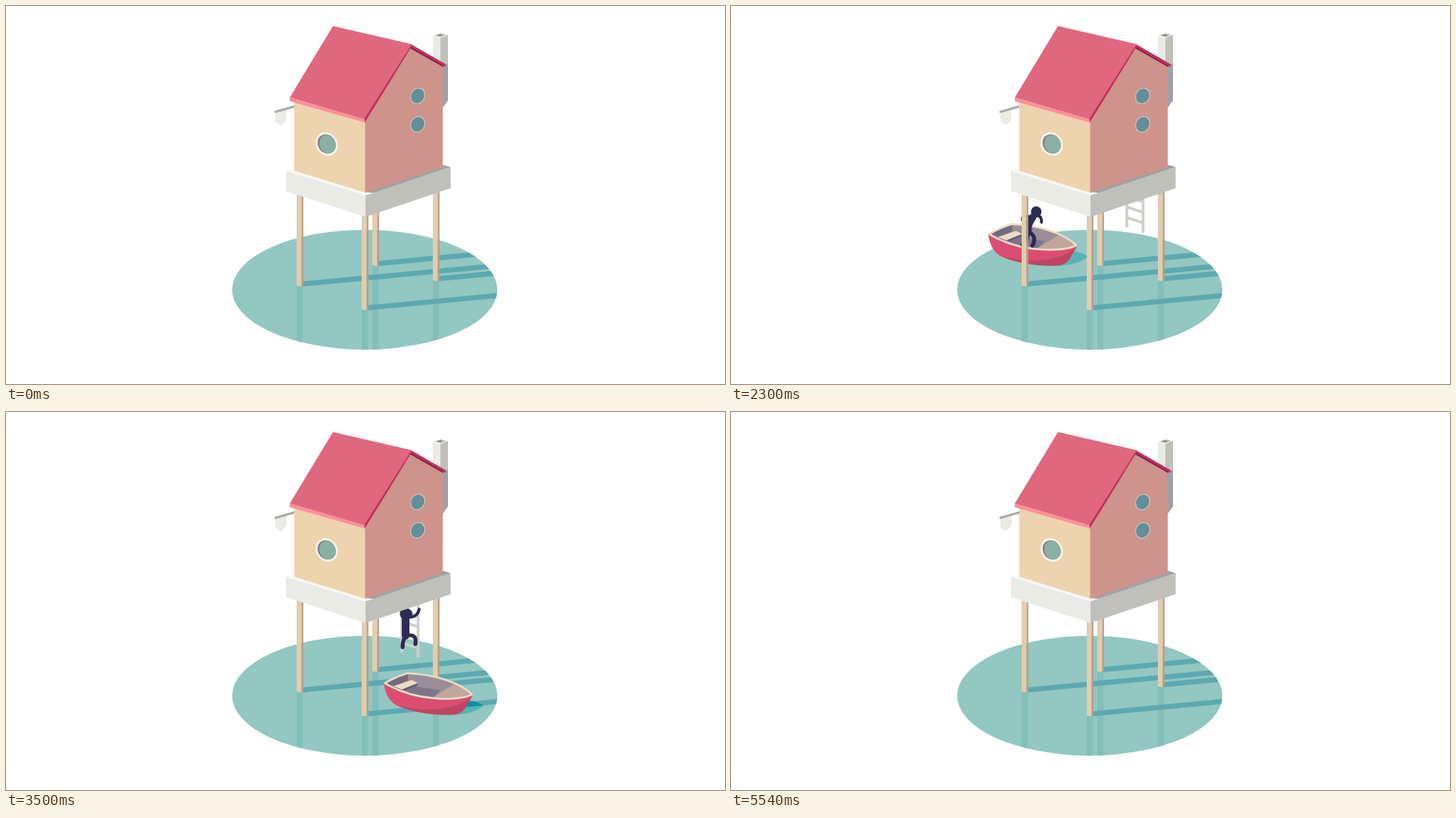
An HTML page for the animation above (6540 ms loop, 950 by 500 pixels).

```html
<!DOCTYPE html>
<html lang="en">
<head>
<meta charset="utf-8">
<title>House on stilts</title>
<style>
  html, body { margin: 0; height: 100%; overflow: hidden; background: #fff; }
  svg { display: block; width: 100vw; height: 100vh; }
  .line { fill: none; stroke-linecap: round; stroke-linejoin: round; }
</style>
</head>
<body>
<svg viewBox="0 0 950 500">
  <defs>
    <ellipse id="pond" cx="474" cy="375.2" rx="175.2" ry="79.2"/>
    <path id="rim" d="M500.500 358.500Q515 350 530.500 345.500C562 347 598 356 615.500 373.500C598 383 540 383 500.500 358.500Z"/>
    <path id="wake" d="M555 399Q610 406 631 388.500Q622 382 606 380Z"/>
    <clipPath id="inPond"><use href="#pond"/></clipPath>
    <clipPath id="inShade"><path class="shade"/></clipPath>
    <clipPath id="inRim"><use href="#rim"/></clipPath>
    <clipPath id="inView"><path d="M300 460V312Q335 287 372 278L450 240H720L700 366L683 389Q670 409 652 430L640 446V460Z"/></clipPath>
    <clipPath id="inWindow"><ellipse rx="12" ry="12.700" transform="translate(423.700 182.500) skewY(8)"/></clipPath>
  </defs>

  <!-- water -->
  <use href="#pond" fill="#93c7c1"/>
  <g clip-path="url(#inPond)">
    <path id="reflections" fill="#83bfb8"/>
    <path class="shade" fill="#5da9b1"/>
    <g clip-path="url(#inView)"><use class="drift" href="#wake" fill="#57b3b5"/></g>
    <g clip-path="url(#inShade)"><use class="drift" href="#wake" fill="#0f8fa2"/></g>
  </g>

  <g id="backPoles"></g>
  <path id="ladder" fill="none" stroke="#cfcfc9" stroke-width="3.700"/>

  <g clip-path="url(#inView)">
    <g class="drift">
      <path fill="#db4e72" d="M499 358C501 374 507 384 518 389C540 398 565 401.500 594 400Q602 398 606 392.500L617 373.500L560 368Z"/>
      <path fill="#bf4560" d="M514 387C545 397 592 397 616 376L606 392.500Q602 398 594 400C565 401.500 535 397 514 387Z"/>
      <g clip-path="url(#inRim)">
        <path fill="#998e97" d="M495 340H620V385H495Z"/>
        <path fill="#7d7589" d="M505 364L532 357L546 364L574 368L561 381L530 378Z"/>
        <path fill="#736b81" d="M499 360L531 344V355L508 366Z"/>
        <path fill="#c2a69b" d="M558 381L597 357L620 365V383Z"/>
        <path fill="#625a70" d="M524 366L544 358.500V361L527 368Z"/>
        <path fill="#ecdcc3" d="M512 362.500L536 354.500L544 358.500L523 367Z"/>
      </g>
      <use href="#rim" class="line" stroke="#ecdcc3" stroke-width="2.600"/>
    </g>
    <g class="line" stroke="#2b2c52">
      <path id="torso" stroke-width="10"/>
      <path id="arms" stroke-width="3.800"/>
      <path id="legs" stroke-width="5.200"/>
      <circle id="head" r="7" fill="#2b2c52" stroke="none"/>
    </g>
  </g>

  <g id="frontPoles"></g>

  <!-- platform -->
  <path fill="#ebebe6" d="M370 218L475 249V279L370 245Z"/>
  <path fill="#bfc0ba" d="M475 250L587.500 213V241L475 279Z"/>
  <path fill="#f8f8f5" d="M370 218L381 214L475 245L486 247L475 250.500Z"/>
  <path fill="#9fa2a5" d="M475 246L577 210L587.500 213L485 247.200Z"/>

  <!-- chimney and flag -->
  <path fill="#ebebe6" d="M564 39L574 42V76L564 70Z"/>
  <path fill="#bfc0ba" d="M574 42L584 38V80H574Z"/>
  <path fill="#9fa1a6" d="M576 80L584 76V125L576 136Z"/>
  <path fill="#f5f5f1" d="M564 39L574 35.500L584 38L574 42Z"/>
  <path fill="#92958f" d="M567 39L574.500 36.500L581 38.200L574 40.800Z"/>
  <path fill="#bfc0ba" d="M574.500 36.500L581 38.200L577 39.700Z"/>
  <path fill="#e9ebe5" d="M356 140L370.500 136V150L364 158L356 153Z"/>
  <path class="line" stroke="#abaca6" stroke-width="3" d="M356 140L384 132"/>

  <!-- house -->
  <path fill="#eed3af" d="M381 124L475 152V247L381 218Z"/>
  <path fill="#ce938a" d="M474.500 154L535 53L577 78V213L474.500 247Z"/>
  <path fill="#8f2149" d="M534 53L578 78V81L534 56Z"/>
  <path fill="#c02f5c" d="M535 50.500L581 77V80.500L535.500 54L474 154.500L473 149Z"/>
  <path fill="#df687e" d="M432 26.500L536 50.500L473 150L375 121Z"/>
  <path fill="#fb9198" d="M375 121L473.500 149.500V154L375 126Z"/>

  <!-- windows -->
  <ellipse rx="14.800" ry="15.500" fill="#f6f3ea" transform="translate(423.700 182.500) skewY(8)"/>
  <g clip-path="url(#inWindow)">
    <path fill="#8c7981" d="M405 165h35v35h-35z"/>
    <ellipse rx="12" ry="12.700" fill="#89b0a3" transform="translate(426 183) skewY(8)"/>
    <g id="peek" fill="#2b2c52">
      <circle cx="429" cy="181" r="7"/>
      <path d="M428 185L438 182V198L431 193Z"/>
    </g>
  </g>
  <g id="sideWindows"></g>
</svg>
<script>
const $ = id => document.getElementById(id);
const all = selector => document.querySelectorAll(selector);
const draw = (el, d) => el.setAttribute('d', d);
const move = (el, x, y) => el.setAttribute('transform', `translate(${x} ${y})`);

const LOOP = 6540;
const ramp = (t, from, to) => Math.min(1, Math.max(0, (t - from) / (to - from)));
const ease = (t, from, to) => { const k = ramp(t, from, to); return k * k * (3 - 2 * k); };
const add = (a, b, k = 1) => [a[0] + b[0] * k, a[1] + b[1] * k];
const mix = (a, b, k) => [a[0] + (b[0] - a[0]) * k, a[1] + (b[1] - a[1]) * k];

// Poles: left x and foot y
const front = [[384, 371], [470, 402.5]], back = [[484, 344], [564, 364]];
const poles = [...front, ...back];
const pole = ([x, y]) =>
  `<path fill="#e2cdae" d="M${x} 235h6.500V${y}L${x} ${y - 1}Z"/>` +
  `<path fill="#b99b87" d="M${x + 6.5} 235h2.300V${y - 0.5}l-2.300 .5Z"/>`;
$('frontPoles').innerHTML = front.map(pole).join('');
$('backPoles').innerHTML = back.map(pole).join('');
draw($('reflections'), poles.map(([x, y]) => `M${x} ${y - 1}h8.300V460h-8.300Z`).join(''));
const shade = poles.map(([x, y]) => `M${x + 8} ${y - 6.8}l300 -28.200v6.800l-300 28.200Z`).join('');
all('.shade').forEach(el => draw(el, shade));

let ladder = 'M523 240V318M544.500 240V325';
for (let y = 263; y < 318; y += 14) ladder += `M523 ${y}l21.500 7.200`;
draw($('ladder'), ladder);

$('sideWindows').innerHTML = [119, 156.5].map(y =>
  `<g transform="translate(544 ${y}) skewY(-8)"><ellipse rx="10.200" ry="11" fill="#c0c1ba"/>` +
  `<ellipse rx="8.600" ry="9.400" fill="#7d7984"/><ellipse cx="-.7" rx="7.900" ry="9.200" fill="#618f9a"/></g>`).join('');

const drift = t => [0.1328 * (t - 3500), 0.0475 * (t - 3500)];

// A curve from a to c that passes through b
const limb = (a, b, c) => `M${a}Q${add(add(b, b), mix(a, c, 0.5), -1)} ${c}`;

function drawMan(t) {
  const crouch = ease(t, 2660, 2980), hang = ease(t, 3080, 3300);
  const stride = t > 3500 ? Math.sin(Math.PI * 3 * (t - 3500) / 1280) ** 2 : 0;
  const aboard = add(add([551.5, 355], drift(t)), [3.5, -2.5], crouch);
  const climbing = [528, 296 - 0.063 * (t - 3500)];
  const hip = mix(aboard, climbing, hang);
  // Joints relative to the hip: standing, then hanging on the ladder
  const joint = (stand, climb, bend = 0, lift = 0) =>
    add(add(hip, mix(add(stand, [1, 5], crouch * bend), climb, hang)), [0, -lift], stride);
  const neck = joint([6, -18], [0, -25], 0.5);
  const head = joint([11, -26], [2, -29], 1.2);
  const arms = [
    [joint([-5, -20], [-5, -26]), joint([-7, -14], [-5, -34])],
    [joint([15, -20], [12, -26], 1), joint([18, -12], [18, -35], 1)]
  ];
  const legs = [
    [joint([-1, 9], [-3, 7]), joint([-7, 18], [-4, 15])],
    [joint([8, 8], [11, 1], 0, 5), joint([6, 19], [13, 11], 0, 14)]
  ];
  $('head').setAttribute('cx', head[0]);
  $('head').setAttribute('cy', head[1]);
  draw($('torso'), limb(neck, add(mix(neck, hip, 0.5), [-2, 0], 1 - hang), hip));
  draw($('arms'), arms.map(a => limb(neck, ...a)).join(''));
  draw($('legs'), legs.map(l => limb(hip, ...l)).join(''));
}

function frame() {
  const t = performance.now() % LOOP;
  all('.drift').forEach(el => move(el, ...drift(t)));
  const peek = ease(t, 460, 860) - ease(t, 1220, 1620);
  move($('peek'), 16 * (1 - peek), 0);
  const down = ease(t, 1940, 2540) - ease(t, 4940, 5540);
  move($('ladder'), 0, -72 * (1 - down));
  drawMan(Math.min(t, 4500));
  requestAnimationFrame(frame);
}
frame();
</script>
</body>
</html>
```
